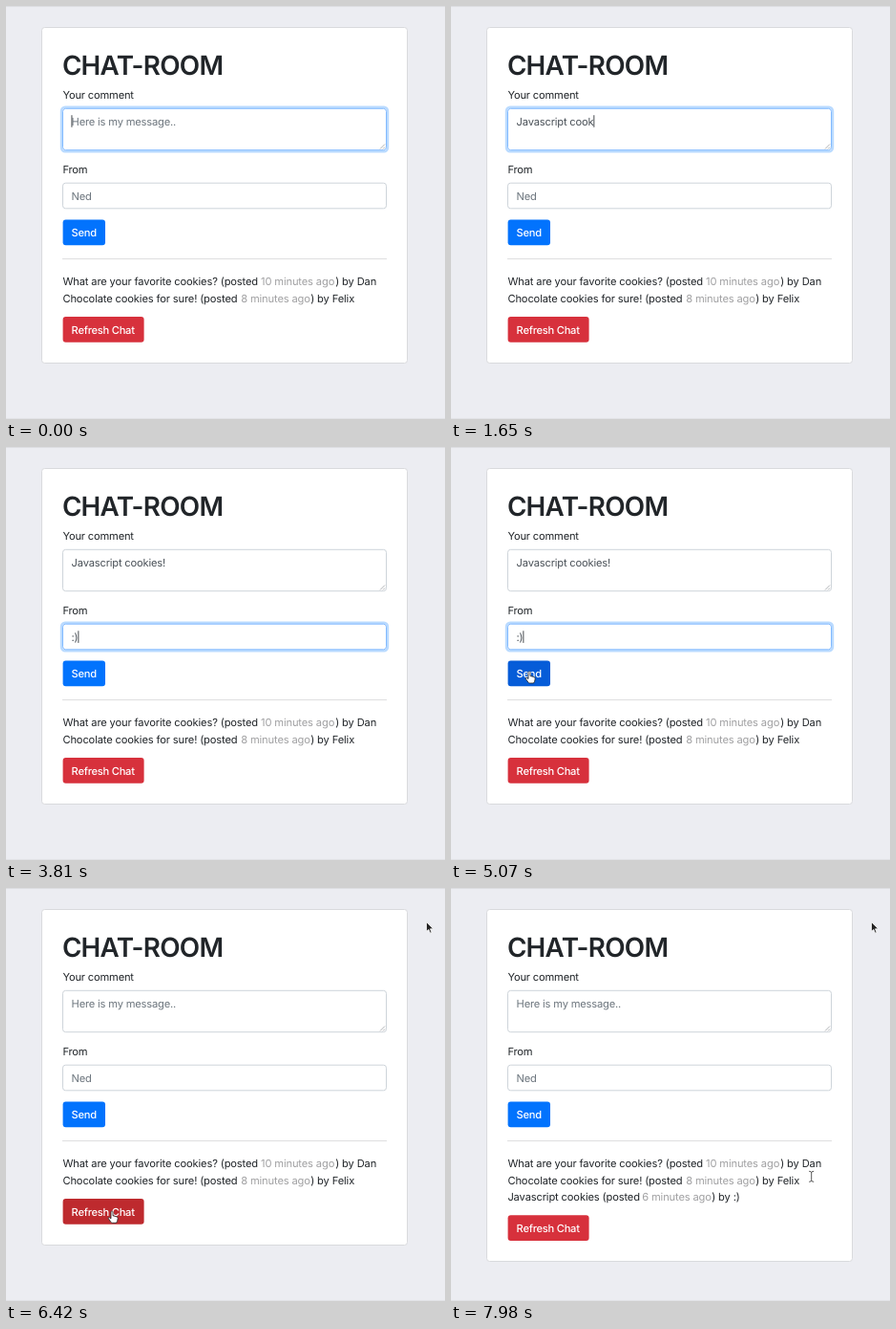
Animation of 460x432 px, one loop 8 s. Source, as an HTML page:

```html
<!DOCTYPE html>
<html lang="en">
<head>
<meta charset="utf-8">
<title>Chat room</title>
<style>
  html, body { margin: 0; width: 100%; height: 100%; overflow: hidden; background: #ecedf2; }
  svg { display: block; width: 100%; height: 100%; }
  text {
    font: 400 11.15px Inter, Roboto, sans-serif; letter-spacing: -.18px;
    fill: #212529; white-space: pre; text-rendering: geometricPrecision;
  }
  .title { font-size: 27.8px; font-weight: 600; letter-spacing: -.75px; }
  .btn { font-weight: 500; letter-spacing: -.25px; fill: #fff; }
  #rows text { letter-spacing: -.14px; }
  .ago { fill: #a0a0a2; }
</style>
</head>
<body>
<svg viewBox="0 0 460 432" xmlns="http://www.w3.org/2000/svg">
  <rect width="460" height="432" fill="#ecedf2"/>
  <path d="M0 .5H460" stroke="#dddee2"/>
  <path d="M0 431.5H460" stroke="#e3e4e8"/>
  <rect id="card" x="37.5" y="22.5" width="383" height="351" rx="3" fill="#fff" stroke="#d9dadd"/>

  <text class="title" x="58.9" y="72">CHAT-ROOM</text>
  <text x="59.4" y="97">Your comment</text>
  <text x="59.4" y="175">From</text>

  <g id="comment">
    <rect class="glow" x="58" y="105.8" width="342" height="46.4" rx="4" fill="none" stroke="#007bff" stroke-width="2.4"/>
    <rect class="box" x="59.5" y="107.3" width="339" height="43.4" rx="3" fill="#fff"/>
    <path d="M392 149.5l5-5M395 149.5l2-2" stroke="#8d9196" stroke-width=".7"/>
    <text class="value" x="68.6" y="124.6"></text>
  </g>
  <g id="from">
    <rect class="glow" x="58" y="183.7" width="342" height="29.6" rx="4" fill="none" stroke="#007bff" stroke-width="2.4"/>
    <rect class="box" x="59.5" y="185.2" width="339" height="26.6" rx="3" fill="#fff"/>
    <text class="value" x="68.6" y="202.6"></text>
  </g>
  <rect id="caret" width=".9" height="12.6" fill="#33383d"/>

  <rect id="send" x="59.6" y="223.5" width="44.4" height="26.7" rx="3"/>
  <text class="btn" x="68.6" y="241">Send</text>

  <path d="M59 264.5H399" stroke="#dfdfe0"/>
  <g id="rows"></g>

  <g id="refresh">
    <rect x="59.6" y="325" width="85" height="26.8" rx="3"/>
    <text class="btn" x="68.6" y="342.5">Refresh Chat</text>
  </g>

  <defs>
    <path id="arrow" d="M0 0V10l2.3-2.2 1.7 3.8 1.6-.7-1.6-3.7h3.2z" fill="#222" stroke="#fff" stroke-width=".8"/>
    <path id="hand" d="M-1 1q1-2 2 0v4l4 1q1.3.4 1.2 1.8l-.6 3q-.3 1.7-1.6 1.7h-3.5q-1 0-1.6-.9l-2.6-3.7q-.2-1.6 1.4-.9l1.3 1z" fill="#fff" stroke="#222" stroke-width=".8"/>
    <path id="beam" d="M-2.5-5.5q2.5 0 2.5 1.5 0-1.5 2.5-1.5M0-4V4M-2.5 5.5q2.5 0 2.5-1.5 0 1.5 2.5 1.5" fill="none" stroke="#444" stroke-width=".9"/>
  </defs>
  <use id="parked" href="#arrow" x="440.5" y="35.6"/>
  <use id="cursor"/>
</svg>

<script>
const LOOP = 8000;
const MESSAGE = 'Javascript cookies!';
const NAME = ':)';
const T = {
  type: 250, key: 95, tab: 2882, name: 3420, nameKey: 200,
  show: 4500, arrive: 4960, click: 5250, clear: 5420,
  toRefresh: 5720, atRefresh: 6240, post: 6900, leave: 7380, end: 7860
};
const SHIFT = 17.2;

const $ = id => document.getElementById(id);
const clamp = v => Math.max(0, Math.min(1, v));
const mix = (a, b, k) => `rgb(${a.map((v, i) => Math.round(v + (b[i] - v) * k))})`;
const smooth = (t, a, b) => { const u = clamp((t - a) / (b - a)); return u * u * (3 - 2 * u); };
// 150 ms fade in at a, fade out at b
const pulse = (t, a, b) => clamp((t - a) / 150) - clamp((t - b) / 150);
const typed = (t, start, step, text) => t < start ? 0 : Math.min(text.length, 1 + Math.floor((t - start) / step));

function addRow(y, said, agoX, ago, byX, who) {
  const row = document.createElementNS('http://www.w3.org/2000/svg', 'text');
  row.setAttribute('y', y);
  row.innerHTML = `<tspan x="59.4">${said} (posted</tspan>` +
    `<tspan class="ago" x="${agoX}">${ago} minutes ago</tspan><tspan x="${byX}">) by ${who}</tspan>`;
  $('rows').append(row);
  return row;
}
addRow(292.4, 'What are your favorite cookies?', 267, 10, 345.2, 'Dan');
addRow(309.5, 'Chocolate cookies for sure!', 246.2, 8, 319.2, 'Felix');
const newRow = addRow(326.6, 'Javascript cookies', 200.2, 6, 273.2, NAME);

function setField(id, text, hint, focus) {
  const [glow, box, value] = ['.glow', '.box', '.value'].map(s => $(id).querySelector(s));
  glow.setAttribute('opacity', .27 * focus);
  box.setAttribute('stroke', mix([206, 212, 218], [128, 185, 255], focus));
  value.textContent = text || hint;
  value.style.fill = text ? '#495057' : '#6c757d';
  return text ? value.getComputedTextLength() : 0;
}

function bezier(a, b, c, s) {
  return a.map((v, i) => (1 - s) ** 2 * v + 2 * s * (1 - s) * b[i] + s * s * c[i]);
}

function cursorAt(t) {
  const start = [262, 224], send = [82, 234.5], refresh = [111, 337.8], rest = [377.7, 301.8];
  if (t < T.toRefresh) return bezier(start, [170, 234], send, smooth(t, T.show, T.arrive));
  if (t < T.leave) return bezier(send, [205, 285], refresh, smooth(t, T.toRefresh, T.atRefresh));
  return bezier(refresh, [240, 325], rest, smooth(t, T.leave, T.end));
}

function cursorKind(x, y, t) {
  const top = t > T.leave ? 325 + SHIFT : 325;
  const inside = (l, a, r, b) => x > l && x < r && y > a && y < b;
  if (inside(59, 223, 104, 250) || inside(59, top, 145, top + 27)) return '#hand';
  return inside(59, 279, 399, t > T.post ? 331 : 314) ? '#beam' : '#arrow';
}

function draw(t) {
  const cleared = t >= T.clear, posted = t >= T.post;

  const msgLen = cleared ? 0 : typed(t, T.type, T.key, MESSAGE);
  const nameLen = cleared ? 0 : typed(t, T.name, T.nameKey, NAME);
  const msgW = setField('comment', MESSAGE.slice(0, msgLen), 'Here is my message..', pulse(t, -200, T.tab));
  const nameW = setField('from', NAME.slice(0, nameLen), 'Ned', pulse(t, T.tab, T.click));

  const onName = t >= T.tab;
  const lastEdit = onName
    ? (nameLen ? T.name + (nameLen - 1) * T.nameKey : T.tab)
    : (msgLen ? T.type + (msgLen - 1) * T.key : 0);
  const caret = $('caret');
  caret.setAttribute('x', 68.5 + (onName ? nameW : msgW));
  caret.setAttribute('y', onName ? 192.3 : 114.2);
  caret.style.display = t < T.click && (t - lastEdit) % 1000 < 500 ? '' : 'none';

  $('send').setAttribute('fill', mix([2, 115, 253], [6, 92, 216], pulse(t, 4850, 5815)));
  $('refresh').firstElementChild.setAttribute('fill', mix([215, 49, 60], [190, 42, 46], pulse(t, 6090, 7430)));

  newRow.style.display = posted ? '' : 'none';
  $('refresh').setAttribute('transform', `translate(0 ${posted ? SHIFT : 0})`);
  $('card').setAttribute('height', posted ? 368 : 351);

  const [x, y] = cursorAt(t);
  const cursor = $('cursor');
  cursor.setAttribute('href', cursorKind(x, y, t));
  cursor.setAttribute('x', x);
  cursor.setAttribute('y', y);
  cursor.style.display = t < T.show ? 'none' : '';
  $('parked').style.display = cleared ? '' : 'none';
}

const began = performance.now();
function tick() {
  draw((performance.now() - began) % LOOP);
  requestAnimationFrame(tick);
}
tick();
</script>
</body>
</html>
```
